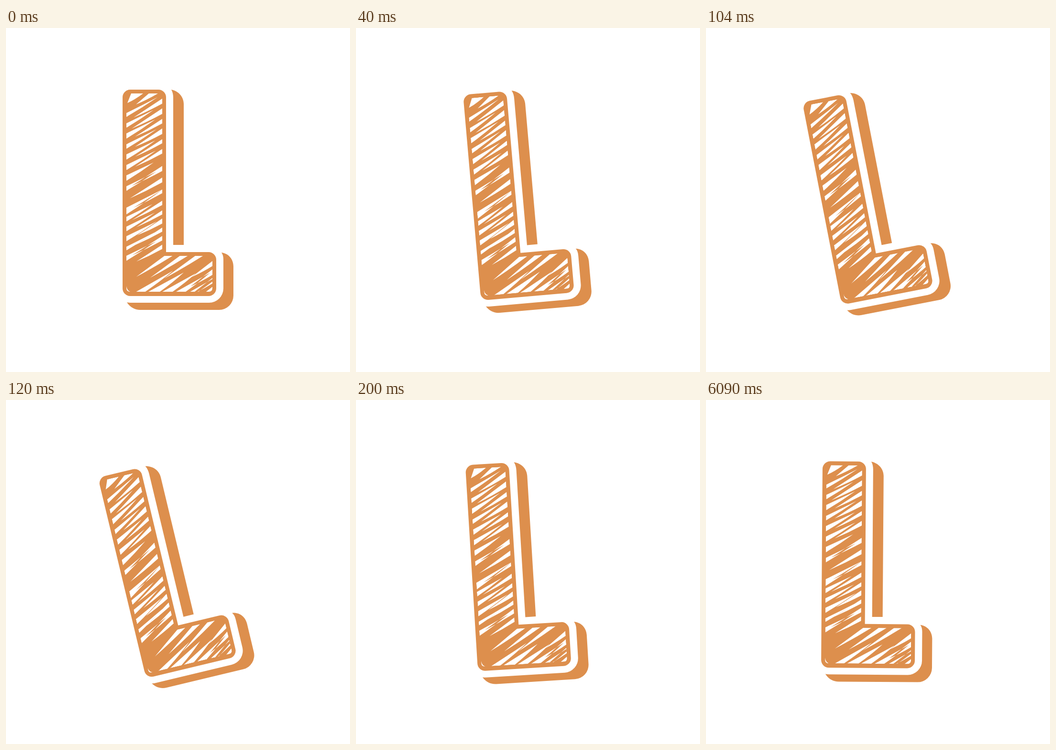
These frames come from a looping animation (720x720 px, 9.99 s). An HTML page:

```html
<!DOCTYPE html>
<html lang="en">
<head>
<meta charset="utf-8">
<title>Wobbling letter L</title>
<style>
  html, body { margin: 0; width: 100%; height: 100%; overflow: hidden; background: #fff; }
  svg { display: block; width: 100vw; height: 100vh; }
</style>
</head>
<body>
<svg viewBox="0 0 720 720">
  <defs>
    <clipPath id="inside">
      <path d="M259 137H320Q327 137 327 144V477H424Q432 477 432 485V544Q432 552 424 552H260Q252 552 252 544V144Q252 137 259 137Z"/>
    </clipPath>
    <filter id="soft" filterUnits="userSpaceOnUse" x="0" y="0" width="720" height="720" color-interpolation-filters="sRGB">
      <feGaussianBlur id="blur" stdDeviation="0"/>
    </filter>
  </defs>
  <g id="lens">
    <g id="letter" fill="#dd8f4d">
      <path d="M346 129C361 132 372 144 372 159V454H350V146C350 140 349 134 346 129Z"/>
      <path d="M451 470C466 472 476 484 476 499V560A30 30 0 0 1 446 590H281C269 590 259 584 253 574Q256 575 260 575H425A30 30 0 0 0 455 545V485C455 479 454 474 451 470Z"/>
      <path d="M260 129H319A16 16 0 0 1 335 145V469H424A16 16 0 0 1 440 485V545A16 16 0 0 1 424 561H260A16 16 0 0 1 244 545V145A16 16 0 0 1 260 129Z"/>
      <path id="gaps" fill="#fff" clip-path="url(#inside)"/>
    </g>
  </g>
</svg>
<script>
(() => {
  const $ = id => document.getElementById(id);

  let seed = 7;
  const vary = amount => {
    seed = (seed * 16807) % 2147483647;
    return 1 + amount * (seed / 2147483647 * 2 - 1);
  };

  // A tapering gap between pen strokes, from its opening (w by h) to a point
  function sliver(x, y, w, h, run, slope) {
    const tx = x + run, ty = y - run * slope;
    const mx = (x + tx) / 2, my = (y + ty) / 2 + 1;
    return `M${x - w / 2} ${y - h / 2}Q${mx - w / 3} ${my - h / 3} ${tx} ${ty}` +
      `Q${mx + w / 3} ${my + h / 3} ${x + w / 2} ${y + h / 2}Z`;
  }

  // Evenly spaced gaps along an upright or a level edge
  const repeat = (count, make) => Array.from({ length: count }, (_, i) => make(i)).join('');
  const upright = (x, y, step, count, size, run, slope) => repeat(count, i =>
    sliver(x, y + i * step, 0, size * vary(0.2), run * vary(0.1), slope));
  const level = (x, y, step, count, size, run) => repeat(count, i =>
    sliver(x + i * step, y, size * vary(0.3), 0, run * vary(0.15), 0.65));

  $('gaps').setAttribute('d', [
    'M262 137H287Q270 150 254 157Z',
    'M299 137H318Q294 151 272 160Z',
    'M252 540Q253 549 260 552H252Z',
    upright(252, 182, 22, 8, 10, 60, 0.57),
    sliver(252, 383, 0, 14, 76, 0.6),
    upright(252, 400, 20.5, 5, 9, 60, 0.57),
    upright(327, 153, 21, 6, 10, -59, 0.57),
    upright(327, 294, 24, 4, 9, -63, 0.57),
    upright(327, 386, 18, 5, 9, -58, 0.57),
    level(340, 477, 32, 3, 18, -72),
    upright(432, 493, 18, 4, 10, -46, 0.65),
    level(282, 552, 28, 5, 19, 64)
  ].join(''));

  // The letter swings left and back in hard steps, drifting and softening a little each time
  const LOOP = 9990, STEP = 40;
  const angles = [0, -5, -11, -13.5, -8.2, -3.5, 0.4];
  let shown = -1;

  function draw(ms) {
    const i = Math.min(angles.length - 1, Math.floor(ms % LOOP / STEP));
    if (i === shown) return;
    shown = i;
    $('letter').setAttribute('transform', `translate(${-0.27 * i} 0) rotate(${angles[i]} 360 360)`);
    $('blur').setAttribute('stdDeviation', 0.25 + i * 0.06);
    if (i) $('lens').setAttribute('filter', 'url(#soft)');
    else $('lens').removeAttribute('filter');
  }

  function tick() {
    draw(performance.now());
    requestAnimationFrame(tick);
  }
  tick();
})();
</script>
</body>
</html>
```
